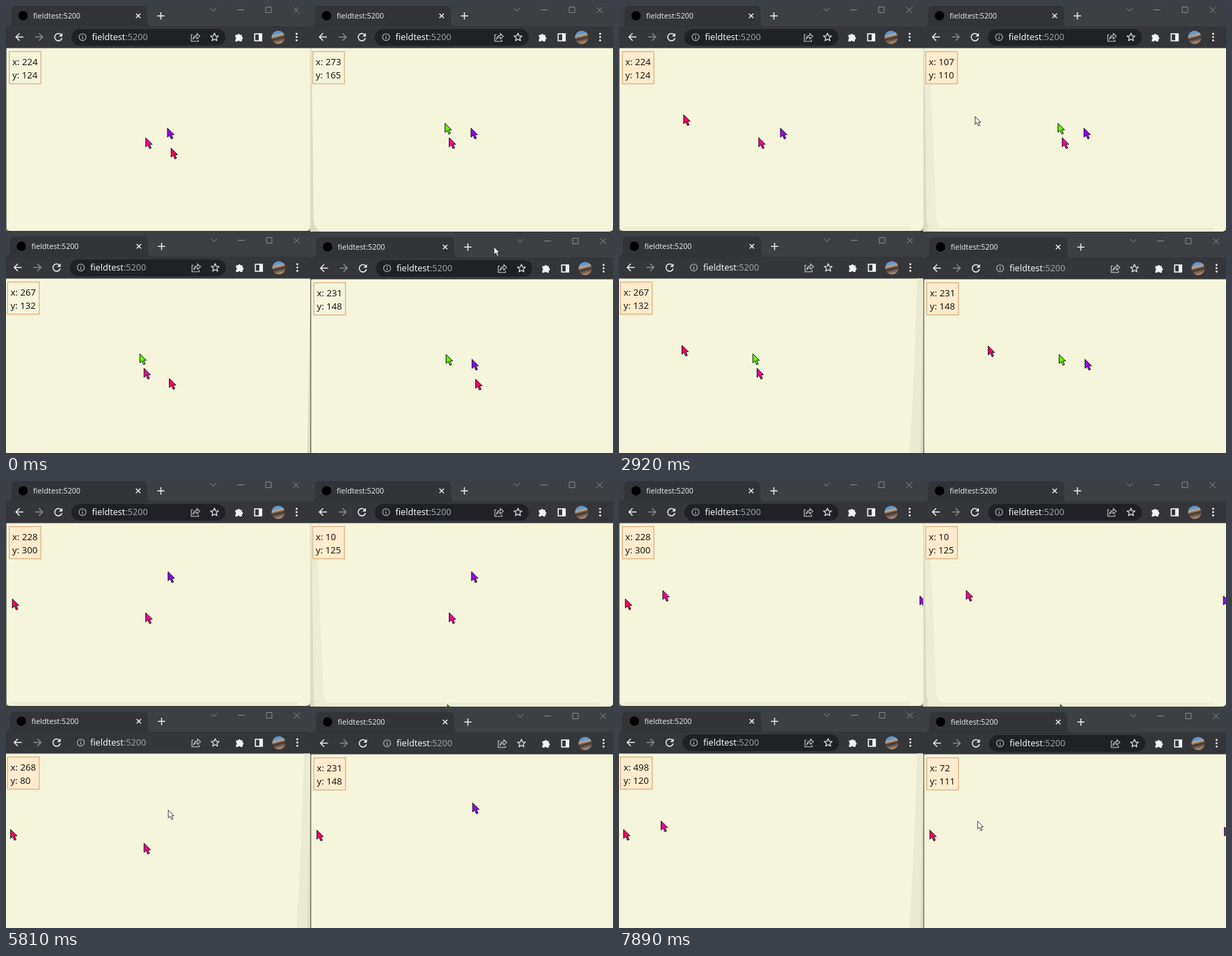
An HTML page for the animation above (8000 ms loop, 872 by 642 pixels).

```html
<!DOCTYPE html>
<html lang="en">
<head>
<meta charset="utf-8">
<title>Shared cursors</title>
<style>
html, body { margin: 0; width: 100%; height: 100%; overflow: hidden; background: #202124; }
svg { display: block; }
text { font-family: "Noto Sans", "Open Sans", sans-serif; white-space: pre; }
.line { fill: none; stroke: #e8eaed; stroke-width: 1.5; }
.thin { fill: none; stroke: #85888b; stroke-width: 1; }
.solid { fill: #f1f3f4; }
</style>
</head>
<body>
<svg id="stage" width="872" height="642" viewBox="0 0 872 642">
  <defs>
    <linearGradient id="photo" x2=".25" y2="1">
      <stop offset=".3" stop-color="#5f97cf"/><stop offset=".45" stop-color="#c3a58a"/>
      <stop offset=".65" stop-color="#3f332d"/><stop offset="1" stop-color="#a98b70"/>
    </linearGradient>
    <path id="arrow" d="M0 0V13L3.1 10.2L5.5 15.6L7.8 14.6L5.5 9.4H9.4Z"/>
  </defs>
</svg>
<script>
const LOOP = 8000, SCALE = 0.867, REFRESH = 120, LEAD = 75, LEAVE = 660;
const HOST = 'fieldtest', PORT = ':5200';

// One browser window and one user per quarter; track: time, x, y in page units
const users = [
  { left: 0, top: 0, color: '#66ff00', rest: [224, 124], track: [
    [3520, 468, 120], [3880, 324, 110], [4200, 250, 138], [4630, 284, 108], [4900, 284, 108],
    [5260, 201, 122], [5400, 197, 172], [5660, 228, 300]] },
  { left: 436, top: 0, color: '#ff0066', rest: [273, 165], track: [
    [LEAVE, 298, 296], [1140, 259, 210], [1700, 182, 130], [2150, 208, 111], [2230, 211, 99],
    [2400, 228, 103], [2770, 145, 105], [3280, 10, 125]] },
  { left: -2.5, top: 331, color: '#9900ff', rest: [267, 132], track: [
    [5660, 262, 11], [5810, 268, 80], [6540, 299, 166], [6850, 295, 92], [7140, 364, 121],
    [7390, 447, 119], [7640, 498, 120]] },
  { left: 437.5, top: 332, color: '#ff0099', rest: [231, 148], track: [
    [7640, 33, 116], [7880, 72, 111], [LOOP, 100, 110]] }
];
users.forEach(u => {
  u.right = u.left + (u.top ? 3.5 : 0);
  u.x = u.left + 0.5;
  u.y = u.top + 61;
});

const bursts = [0, LEAVE, 1430, 2920, 4030, 5810, 6660, 7640];

const rect = (x, y, w, h, rest) => `<rect x="${x}" y="${y}" width="${w}" height="${h}" ${rest}/>`;
const line = (d, cls = 'line') => `<path class="${cls}" d="${d}"/>`;
const disc = (x, y, r, rest) => `<circle cx="${x}" cy="${y}" r="${r}" ${rest}/>`;
const star = Array.from({ length: 10 }, (_, i) => {
  const r = i % 2 ? 2.7 : 6, a = i * Math.PI / 5;
  return `${299.5 + r * Math.sin(a)} ${45 - r * Math.cos(a)}`;
}).join('L');

const leftIcons = `
  ${disc(24.5, 14, 6.7, 'fill="#000"')}
  <text x="39" y="18" font-size="10.7" fill="#dfe1e5">${HOST + PORT}</text>
  ${line('M25 44.5H14.5M19.5 39.3L14.3 44.5L19.5 49.7')}
  <g opacity=".45">${line('M42 44.5H52.5M47.5 39.3L52.7 44.5L47.5 49.7')}</g>
  ${line('M79 41.2A5.2 5.2 0 1 0 80.3 46')}<path class="solid" d="M81 38.8V43.8H76Z"/>
  <circle cx="110" cy="44.7" r="5" fill="none" stroke="#b5b8bc" stroke-width="1.1"/>
  <path d="M110 44V47.7M110 41.7V43" stroke="#b5b8bc" stroke-width="1.2"/>
  <text x="123.5" y="49.2" font-size="12.6" fill="#f1f3f4">${HOST}<tspan fill="#9aa0a6">${PORT}</tspan></text>`;

const rightIcons = `
  ${line('M186.7 11L193 17.3M193 11L186.7 17.3')}
  ${line('M217.3 14.3H227.7M222.5 9V19.5')}
  ${line('M293.5 3L297.7 7.3L302 3M332 5.5H342M373 1.5H381V9.5H373ZM412.5 1.5L421 10M421 1.5L412.5 10', 'thin')}
  <g stroke-width="1.1" opacity=".82" fill="none" stroke="#e8eaed">
    <path d="M268.5 41.2H266.2V50.8H276.5V48.2M268.8 47.5C269.2 44 271.4 42.4 274.2 42.4V39.6L278.4 43.6L274.2 47.3V44.8C271.8 44.8 270.2 45.6 268.8 47.5Z"/>
  </g>
  <path class="line" style="stroke-width:1.2" stroke-linejoin="round" d="M${star}Z"/>
  <path class="solid" d="M329.5 41.5H332.3A2 2 0 0 1 336.2 41.5H338.8V44.3A2 2 0 0 1 338.8 48.2V51H335.8A1.8 1.8 0 0 0 332.4 51H329.5V47.8A1.8 1.8 0 0 0 329.5 44.5Z"/>
  ${rect(357.3, 40, 10, 10, 'fill="none" stroke="#f1f3f4" stroke-width="1.6"')}${rect(363, 40, 4.5, 10, 'class="solid"')}
  ${disc(391, 45, 9.6, 'fill="url(#photo)"')}
  ${[40, 44.7, 49.4].map(y => disc(417.5, y, 1.4, 'class="solid"')).join('')}`;

const edges = {
  1: `<path class="shade" d="M440 112H448L456 308Q457 318 470 324H450Q443 318 442 308Z" fill="#ecedd4"/>
      <path d="M437 61H439L442 308Q443 320 452 324H437Z" fill="#dcdcc5"/>`,
  2: `<path class="shade" d="M428 391H438V642H417Q424 540 428 391Z" fill="#ebebd3"/>
      <path d="M438 400L436 460L433 642H438Z" fill="#dcdcc5"/>`
};

function drawWindow(w, i) {
  const { left, right, top } = w;
  const upper = i < 2, column = i % 2 * 437, strip = Math.max(0, top - 8);
  const a = left + 8, b = right + 203;
  const px = Math.max(0, left + 0.8), py = top + 60.5;
  const pw = (i % 2 ? 872 : 437) - px, ph = 262.5 + i % 2;
  return `
    ${rect(column, strip, 437, top + 30 - strip, 'fill="#3c4043"')}
    ${rect(column, top + 29, 437, 32, 'fill="#35363a"')}
    ${rect(column, top + 61, 437, 262, 'fill="#77776c"')}
    <path d="M${a - 8} ${top + 30}q8 0 8 -8v-15q0 -7 7 -7H${b - 7}q7 0 7 7v15q0 8 8 8Z" fill="#323438"/>
    ${rect(left + 94, top + 33, right - left + 221, 24, `rx="12" fill="#202124" ${upper ? '' : 'class="pill"'}`)}
    <g transform="translate(${left} ${top})">${leftIcons}</g>
    <g transform="translate(${right} ${top})">${rightIcons}</g>
    <svg x="${px}" y="${py}" width="${pw}" height="${ph}" viewBox="${px} ${py} ${pw} ${ph}" overflow="hidden">
      ${rect(px, py - 10, pw, ph + 10, `rx="${upper ? 5 : 0}" fill="#f5f5dc"`)}
      ${edges[i] || ''}
      ${upper ? rect(px + 6, py + ph - 6, pw - 24, 5, 'class="shade" rx="2" fill="#ecedd4"') : ''}
      <g transform="translate(${w.x} ${w.y})">
        ${rect(4.2, 4.5, 45.5, 46.2, 'class="label" stroke="#deb181" stroke-width="1.3"')}
        <text class="px" x="8.6" y="24.3" font-size="13.2" fill="#1b1b16"></text>
        <text class="py" x="8.6" y="43" font-size="13.2" fill="#1b1b16"></text>
        ${users.map((u, k) => k === i ? '' : `<use href="#arrow" class="user${k}" fill="${u.color}" stroke="#15151a" stroke-width="1"/>`).join('')}
      </g>
    </svg>`;
}

const stage = document.getElementById('stage');
stage.insertAdjacentHTML('beforeend', rect(0, 0, 872, 642, 'fill="#202124"') +
  users.map(drawWindow).join('') +
  '<use id="native" href="#arrow" fill="#fff" stroke="#222" stroke-width="1"/>');

const all = selector => [...stage.querySelectorAll(selector)];
const parts = {
  pill: all('.pill'), shade: all('.shade'), label: all('.label'), px: all('.px'), py: all('.py'),
  users: users.map((_, k) => all('.user' + k)), native: document.getElementById('native')
};

// Smooth curve through the track's points
function locate({ rest, track }, t) {
  if (t < track[0][0]) return rest;
  const last = track.length - 1;
  const n = track.findIndex(point => point[0] > t);
  if (n < 0) return track[last].slice(1);
  const p = track[n - 1], q = track[n], span = q[0] - p[0], k = (t - p[0]) / span;
  const before = track[Math.max(0, n - 2)], after = track[Math.min(last, n + 1)];
  return [1, 2].map(c => {
    const m = span * (q[c] - before[c]) / (q[0] - before[0]);
    const o = span * (after[c] - p[c]) / (after[0] - p[0]);
    const d = q[c] - p[c];
    return p[c] + k * (m + k * (3 * d - 2 * m - o + k * (m + o - 2 * d)));
  });
}

function nativeSpot(t) {
  if (t < LEAVE) return [701, 346];
  const ahead = t + LEAD, since = u => u.track[0][0];
  const user = users.filter(u => since(u) <= ahead).sort((a, b) => since(b) - since(a))[0];
  const [x, y] = locate(user, ahead);
  return [user.x + x * SCALE, user.y + y * SCALE];
}

function render(time) {
  const burst = bursts.findLast(b => b <= time);
  const t = burst + Math.floor((time - burst) / REFRESH) * REFRESH;

  users.forEach((user, i) => {
    const [x, y] = locate(user, t);
    parts.px[i].textContent = 'x: ' + Math.round(x);
    parts.py[i].textContent = 'y: ' + Math.round(y);
    parts.users[i].forEach(el => el.setAttribute('transform', `translate(${x * SCALE} ${y * SCALE})`));
    parts.label[i].setAttribute('fill', t >= (i % 2 ? LEAVE : 2920) ? '#ffebcd' : '#f5f5dc');
  });

  const show = (els, on) => els.forEach(el => el.setAttribute('visibility', on ? 'visible' : 'hidden'));
  show(parts.shade, t >= LEAVE);
  show(parts.pill, t < LEAVE || t >= 6660);
  parts.native.setAttribute('transform', `translate(${nativeSpot(t)}) scale(.86)`);
}

const start = performance.now();
function loop() {
  render((performance.now() - start) % LOOP);
  requestAnimationFrame(loop);
}
loop();
</script>
</body>
</html>
```
